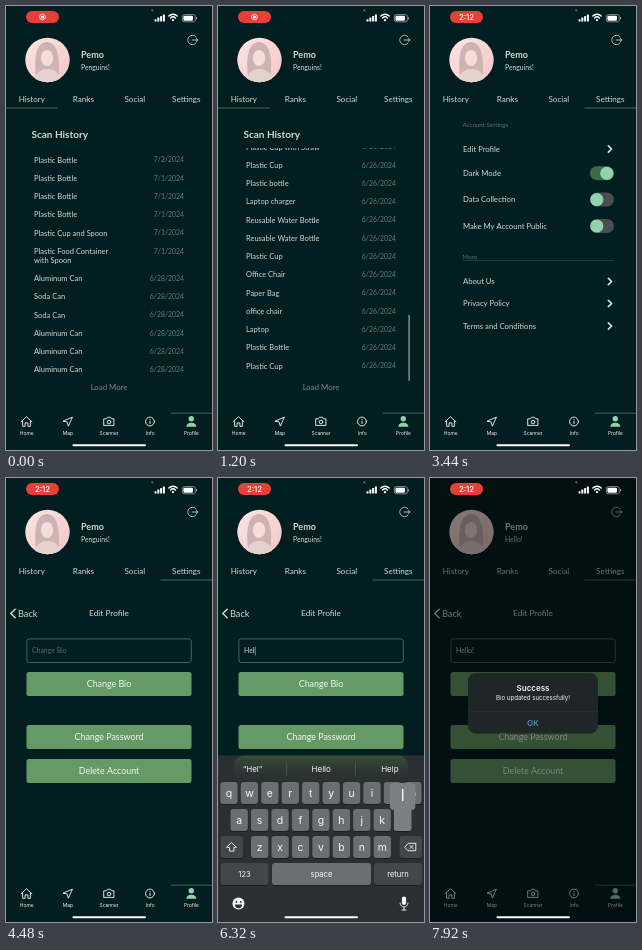
These frames come from a looping animation (206 by 444 pixels, 8000 ms). An HTML page with a canvas:

```html
<!DOCTYPE html>
<html lang="en">
<head>
<meta charset="utf-8">
<title>Profile screen</title>
<style>
html, body { margin: 0; width: 100%; height: 100%; overflow: hidden; background: #031e20; }
canvas { display: block; width: 206px; height: 444px; }
</style>
</head>
<body>
<canvas id="stage"></canvas>
<script>
const W = 206, H = 444, LOOP = 8000;
const BG = '#031e20', INK = '#cddad4', GREY = '#687876', MINT = '#92d3ab', GREEN = '#659a66';
const UI = 'Lato, "Open Sans", sans-serif', SYS = 'Inter, Roboto, sans-serif';

const canvas = document.getElementById('stage');
const c = canvas.getContext('2d');
const dpr = Math.max(1, window.devicePixelRatio || 1);
canvas.width = W * dpr;
canvas.height = H * dpr;

const clamp = v => Math.max(0, Math.min(1, v));
const span = (t, start, dur) => clamp((t - start) / dur);
const easeOut = u => 1 - (1 - u) ** 3;
const within = (t, a, b) => t >= a && t < b;

// ---- drawing helpers ----
function text(s, x, y, size, { color = INK, align = 'left', weight = 400, font = UI } = {}) {
  c.font = `${weight} ${size}px ${font}`;
  c.textAlign = align;
  c.fillStyle = color;
  c.fillText(s, x, y + size * 0.34);
}
function box(x, y, w, h, r, fill, stroke) {
  c.beginPath();
  c.roundRect(x, y, w, h, r);
  if (fill) { c.fillStyle = fill; c.fill(); }
  if (stroke) { c.strokeStyle = stroke; c.lineWidth = 0.8; c.stroke(); }
}
function disc(x, y, r, fill) {
  c.beginPath();
  c.arc(x, y, r, 0, 7);
  c.fillStyle = fill;
  c.fill();
}
function path(d, x, y, { stroke, fill, width = 1 } = {}) {
  const p = new Path2D(d);
  c.save();
  c.translate(x, y);
  c.lineCap = c.lineJoin = 'round';
  if (fill) { c.fillStyle = fill; c.fill(p); }
  if (stroke) { c.strokeStyle = stroke; c.lineWidth = width; c.stroke(p); }
  c.restore();
}
function layer(dx, dy, draw) {
  c.save();
  c.translate(dx, dy);
  draw();
  c.restore();
}

// ---- scan history ----
const PITCH = 18.25, COUNT = 43, LIST_TOP = 142, LIST_H = 234;
const head = ['Plastic Bottle', 'Plastic Bottle', 'Plastic Bottle', 'Plastic Bottle', 'Plastic Cup and Spoon',
  'Plastic Food Container', 'Aluminum Can', 'Soda Can', 'Soda Can', 'Aluminum Can', 'Aluminum Can', 'Aluminum Can'];
const tail = ['Plastic Cup with Straw', 'Plastic Cup', 'Plastic bottle', 'Laptop charger', 'Reusable Water Bottle',
  'Reusable Water Bottle', 'Plastic Cup', 'Office Chair', 'Paper Bag', 'office chair', 'Laptop', 'Plastic Bottle', 'Plastic Cup'];
const rowY = i => 154 + i * PITCH + (i > 5 ? 9 : 0);
const MAX_SCROLL = rowY(COUNT - 1) - 360;

function itemName(i) {
  if (i < head.length) return head[i];
  const k = i - (COUNT - tail.length);
  return k >= 0 ? tail[k] : tail[(i * 7 + 3) % tail.length];
}
function itemDate(i) {
  const day = i < 1 ? '7/2' : i < 6 ? '7/1' : i < 19 ? '6/28' : i < 25 ? '6/27' : '6/26';
  return day + '/2024';
}
function historyPage(t) {
  const scroll = MAX_SCROLL * easeOut(span(t, 80, 860));
  text('Scan History', 25.5, 128.5, 10, { weight: 700 });
  c.save();
  c.beginPath();
  c.rect(0, LIST_TOP, W, LIST_H);
  c.clip();
  for (let i = 0; i < COUNT; i++) {
    const y = rowY(i) - scroll;
    if (y < LIST_TOP - 20 || y > LIST_TOP + LIST_H + 10) continue;
    text(itemName(i), 28, y, 7.5);
    if (i === 5) text('with Spoon', 28, y + 9, 7.5);
    text(itemDate(i), 178, y, 6.9, { color: GREY, align: 'right' });
  }
  c.restore();
  if (t > 80) {
    const barH = LIST_H * LIST_H / (LIST_H + MAX_SCROLL) - 2;
    const y = LIST_TOP + 1 + (LIST_H - 2 - barH) * scroll / MAX_SCROLL;
    box(190.4, y, 1.4, barH, 0.7, '#8a9795');
  }
  text('Load More', 103, 381, 7.8, { color: '#7b8a88', align: 'center' });
}

// ---- other tab pages ----
function soonPage() {
  text('Coming Soon!', 103, 255, 7.3, { align: 'center' });
}
function sectionLabel(label, y) {
  text(label, 32.5, y, 6.2, { color: '#5d706e' });
}
function linkRow(label, y) {
  text(label, 33, y, 7.7);
  path('M-1.6 -3.2L1.6 0L-1.6 3.2', 180, y, { stroke: '#d5dedb', width: 1.7 });
}
function toggleRow(label, y, on) {
  text(label, 33, y, 7.7);
  box(160, y - 7, 24, 14, 7, on ? '#3b6a4c' : '#4b4d50');
  disc(on ? 176.8 : 166.8, y, 6.6, MINT);
}
function settingsPage(t) {
  sectionLabel('Account Settings', 118.5);
  c.globalAlpha = within(t, 3760, 3920) ? 0.45 : 1;
  linkRow('Edit Profile', 143);
  c.globalAlpha = 1;
  toggleRow('Dark Mode', 167.3, true);
  toggleRow('Data Collection', 193.6, false);
  toggleRow('Make My Account Public', 220, false);
  sectionLabel('More', 251);
  box(32.5, 254.3, 151.5, 0.6, 0, '#2b4644');
  linkRow('About Us', 275.5);
  linkRow('Privacy Policy', 297.5);
  linkRow('Terms and Conditions', 320);
}

// ---- edit profile ----
const strokes = [['H', 5760], ['e', 6000], ['l', 6240], ['l', 6400], ['o', 6640], ['!', 7040]];
const SYMBOLS_AT = 6840, KEYS_UP = 4940, KEYS_DOWN = 7270, SAVED = 7640;
const typed = t => strokes.filter(s => t >= s[1]).map(s => s[0]).join('');

function button(label, y, alpha = 1) {
  c.globalAlpha = alpha;
  box(20.5, y, 165, 24, 2.5, GREEN);
  text(label, 103, y + 12, 8.9, { color: '#f2f6f2', align: 'center' });
  c.globalAlpha = 1;
}
function editPage(t) {
  const bio = typed(t);
  path('M2.2 -4.2L-2.2 0L2.2 4.2', 7, 135.5, { stroke: INK, width: 1.5 });
  text('Back', 12, 135.5, 9.2);
  text('Edit Profile', 103, 135.5, 8.3, { align: 'center' });
  box(20.9, 160.9, 164.4, 23.6, 2.5, null, '#56706f');
  text(bio || 'Change Bio', 26, 173, 6.9, { color: bio ? INK : '#566a69' });
  const last = strokes.reduce((m, s) => t >= s[1] ? s[1] : m, KEYS_UP);
  if (within(t, KEYS_UP, KEYS_DOWN) && (t - last) % 1000 < 560) {
    const x = 26.3 + (bio ? c.measureText(bio).width : 0);
    box(x, 168.5, 0.9, 9, 0.4, '#6f9de0');
  }
  button('Change Bio', 194, within(t, 7520, 7640) ? 0.4 : 1);
  button('Change Password', 247);
  button('Delete Account', 281);
}

// ---- keyboard ----
const KEY = '#6a6f71', DARK_KEY = '#42484a', WHITE = '#f4f6f6';
let bubbles = [];

function key(x, y, w, label, fill = KEY, size = 10.5) {
  box(x, y + 0.8, w, 22, 3, '#16191a');
  box(x, y, w, 22, 3, fill);
  if (label) text(label, x + w / 2, y + 11, size, { color: WHITE, align: 'center', font: SYS });
}
function suggestions(s) {
  if (!s) return ['I', 'The', 'I’m'];
  if (s.endsWith('!')) return ['I', 'I’m', 'We'];
  const near = { H: ['He', 'Hey'], He: ['Hey', 'Hello'], Hel: ['Hello', 'Help'], Hell: ['Hello', 'Hell'], Hello: ['Hello', 'Hellos'] };
  return [`“${s}”`, ...near[s]];
}
function keyRow(chars, cx, pitch, w, y, pressed) {
  [...chars].forEach((ch, i) => {
    const x = cx + i * pitch - w / 2;
    key(x, y, w, ch);
    if (ch === pressed) bubbles.push([x, y, w, ch]);
  });
}
function keyboard(t) {
  const symbols = t >= SYMBOLS_AT, upper = t < strokes[0][1] + 100;
  const hit = strokes.find(s => within(t, s[1] - 20, s[1] + 100));
  const pressed = hit && hit[0];
  const shape = s => upper ? s.toUpperCase() : s;
  bubbles = [];

  box(0, 277.5, W, 170, 0, '#2a3032');
  const glow = c.createLinearGradient(0, 277, 0, 306);
  glow.addColorStop(0, 'rgba(62,90,58,.75)');
  glow.addColorStop(1, 'rgba(42,48,50,0)');
  box(16, 277.5, 174, 28, 10, glow);
  suggestions(typed(t)).forEach((s, i) =>
    text(s, 34.5 + i * 68.7, 291, 8, { color: WHITE, align: 'center', font: SYS }));
  box(68.5, 284.5, 0.6, 13, 0, '#5a6462');
  box(137, 284.5, 0.6, 13, 0, '#5a6462');

  if (symbols) {
    keyRow('1234567890', 11, 20.43, 17.4, 304, pressed);
    keyRow('-/:;()$&@”', 11, 20.43, 17.4, 331, pressed);
    keyRow('.,?!’', 47, 27.6, 24.4, 358, pressed);
    key(2.5, 358, 22.5, '#+=', DARK_KEY, 6.5);
  } else {
    keyRow(shape('qwertyuiop'), 11, 20.43, 17.4, 304, pressed);
    keyRow(shape('asdfghjkl'), 21.2, 20.43, 17.4, 331, pressed);
    keyRow(shape('zxcvbnm'), 41.7, 20.43, 17.4, 358, pressed);
    key(2.5, 358, 22.5, '', upper ? '#d5d9da' : DARK_KEY);
    path('M0 -4.5L4.7 0H2.2V3.8H-2.2V0H-4.7Z', 13.7, 369.3, upper ? { fill: '#111' } : { stroke: WHITE, width: 0.9 });
  }
  key(181.5, 358, 22.5, '', DARK_KEY);
  path('M-5.5 0L-2.2 -3.7H5.3V3.7H-2.2ZM-.6 -1.6L2.6 1.6M2.6 -1.6L-.6 1.6', 192.5, 369, { stroke: WHITE, width: 0.9 });
  key(2.5, 385, 48, symbols ? 'ABC' : '123', DARK_KEY, 7.6);
  key(54, 385, 99, 'space', KEY, 7.6);
  key(156, 385, 48, 'return', DARK_KEY, 7.6);

  for (const [x, y, w, ch] of bubbles) {
    box(x - 4, y - 26, w + 8, 27, 4, '#7b8082');
    box(x, y - 4, w, 26, 3, '#7b8082');
    text(ch, x + w / 2, y - 13, 16, { color: WHITE, align: 'center', font: SYS });
  }

  disc(20.5, 425.5, 6, WHITE);
  disc(18.3, 424, 0.9, '#2a3032');
  disc(22.7, 424, 0.9, '#2a3032');
  path('M-3.6 .8H3.6A3.6 3.6 0 0 1 -3.6 .8Z', 20.5, 425.8, { fill: '#2a3032' });
  box(183.9, 418.5, 4.2, 8.5, 2.1, WHITE);
  path('M-4 -1A4 4 0 0 0 4 -1M0 3.2V6M-2 6H2', 186, 426, { stroke: WHITE, width: 0.9 });
}

// ---- frame of the app ----
function avatar() {
  c.save();
  c.beginPath();
  c.arc(41.5, 54, 22.2, 0, 7);
  c.clip();
  const g = c.createLinearGradient(20, 32, 62, 76);
  g.addColorStop(0, '#fbe6e2');
  g.addColorStop(1, '#f3c6c6');
  c.fillStyle = g;
  c.fillRect(18, 30, 48, 48);
  path('M-9 26C-14 8 -13 -17 0 -17C13 -17 14 8 10 26Z', 41, 53, { fill: '#cdb3b4' });
  path('M-14 26C-12 12 -5 10 0 10C6 10 13 12 15 26Z', 41, 53, { fill: '#e6d2cd' });
  c.beginPath();
  c.ellipse(41, 52, 6.2, 8, 0, 0, 7);
  c.fillStyle = '#f5ded6';
  c.fill();
  c.restore();
}
function header(t, page) {
  avatar();
  text('Pemo', 75, 48.5, 9, { weight: 700 });
  text(t >= SAVED ? 'Hello!' : 'Penguins!', 75, 61.5, 6.8);
  path('M3.4 -3.2A4.7 4.7 0 1 0 3.4 3.2M-.5 0H5.4M3.6 -1.8L5.4 0L3.6 1.8', 186.5, 34, { stroke: INK, width: 0.8 });
  ['History', 'Ranks', 'Social', 'Settings'].forEach((s, i) =>
    text(s, 25.8 + i * 51.5, 93, 8.1, { align: 'center' }));
  box(page * 51.5, 101.6, 51.5, 0.8, 0, '#4d6663');
}
function nav() {
  box(0, 404, W, 40, 0, BG);
  box(165, 406.8, 41, 0.8, 0, '#4c755f');
  const pen = { stroke: WHITE, width: 0.9 };
  path('M-5.4 .2L0 -4.8L5.4 .2M-3.9 -.8V4.8H-1.4V1.4H1.4V4.8H3.9V-.8', 20.5, 415.5, pen);
  path('M-4.6 -.4L4.4 -4.4L.4 4.6L-.8 .8Z', 62, 415.5, pen);
  path('M-4.9 -2.7H-2.5L-1.5 -4.2H1.5L2.5 -2.7H4.9V3.9H-4.9ZM1.8 .5A1.8 1.8 0 1 1 -1.8 .5A1.8 1.8 0 1 1 1.8 .5', 103, 415.5, pen);
  path('M4.4 0A4.4 4.4 0 1 1 -4.4 0A4.4 4.4 0 1 1 4.4 0M0 -.4V2.2M0 -2.2V-2.1', 144, 415.5, pen);
  disc(185.3, 412.8, 2.7, MINT);
  path('M-5 5.2C-5 -.2 5 -.2 5 5.2Z', 185.3, 415.6, { fill: MINT });
  ['Home', 'Map', 'Scanner', 'Info', 'Profile'].forEach((s, i) =>
    text(s, 20.7 + i * 41.2, 427.2, 4.9, { color: WHITE, align: 'center', font: SYS }));
}
function status(t) {
  box(20, 5, 33, 12, 6, '#ea3f39');
  const clock = span(t, 2640, 240);
  c.globalAlpha = 1 - clock;
  path('M2.9 0A2.9 2.9 0 1 1 -2.9 0A2.9 2.9 0 1 1 2.9 0', 36.5, 11, { stroke: '#fff', width: 0.7 });
  disc(36.5, 11, 1.6, '#fff');
  c.globalAlpha = clock;
  text('2:12', 36.5, 11, 7.8, { color: '#fff', align: 'center', weight: 500, font: SYS });
  c.globalAlpha = 1;
  disc(146.3, 4.3, 1, '#5f8a52');
  for (let i = 0; i < 4; i++) box(148.5 + i * 2.8, 13.2 - i * 1.6, 2, 2.4 + i * 1.6, 0.5, '#fff');
  path('M-4.2 -2A6 6 0 0 1 4.2 -2M-2.4 0A3.4 3.4 0 0 1 2.4 0', 167, 12, { stroke: '#fff', width: 1.4 });
  disc(167, 14.1, 1.2, '#fff');
  box(176.3, 8.6, 13, 7.2, 2, null, '#9aa5a5');
  box(177.4, 9.7, 9.6, 5, 1.1, '#fff');
  box(190, 10.9, 0.9, 2.6, 0.4, '#9aa5a5');
}
function alertBox(u) {
  c.fillStyle = `rgba(0,0,0,${0.48 * u})`;
  c.fillRect(0, 0, W, H);
  const s = 1.16 - 0.16 * easeOut(u);
  c.save();
  c.globalAlpha = u;
  c.translate(103, 225.5);
  c.scale(s, s);
  c.translate(-103, -225.5);
  box(38, 195, 130, 60.5, 8, '#1f2627');
  text('Success', 103, 210, 8, { color: WHITE, align: 'center', weight: 600, font: SYS });
  text('Bio updated successfully!', 103, 220.3, 6.1, { color: WHITE, align: 'center', font: SYS });
  box(38, 233.5, 130, 0.6, 0, '#2c3435');
  text('OK', 103, 244.8, 8, { color: '#4b8ba3', align: 'center', weight: 600, font: SYS });
  c.restore();
}

function draw(t) {
  c.setTransform(dpr, 0, 0, dpr, 0, 0);
  c.globalAlpha = 1;
  c.fillStyle = BG;
  c.fillRect(0, 0, W, H);

  const page = easeOut(span(t, 1600, 500)) + easeOut(span(t, 2250, 480)) + easeOut(span(t, 2830, 480));
  const push = easeOut(span(t, 3920, 440));
  header(t, page);

  c.save();
  c.beginPath();
  c.rect(0, 104, W, 300);
  c.clip();
  [historyPage, soonPage, soonPage, settingsPage].forEach((drawPage, i) => {
    const x = (i - page) * W;
    if (Math.abs(x) < W && push < 1) layer(x - push * 62, 0, () => drawPage(t));
  });
  if (push > 0) layer((1 - push) * W, 0, () => {
    box(0, 104, W, 300, 0, BG);
    editPage(t);
  });
  c.restore();

  nav();
  const up = easeOut(span(t, KEYS_UP, 300)) - easeOut(span(t, KEYS_DOWN, 270));
  if (up > 0) layer(0, (1 - up) * 168, () => keyboard(t));
  const alertIn = span(t, SAVED, 200);
  if (alertIn > 0) alertBox(alertIn);
  status(t);
  box(66.5, 438.3, 73.5, 2, 1, '#fff');
}

const start = performance.now();
function tick() {
  draw((performance.now() - start) % LOOP);
  requestAnimationFrame(tick);
}
tick();
</script>
</body>
</html>
```
